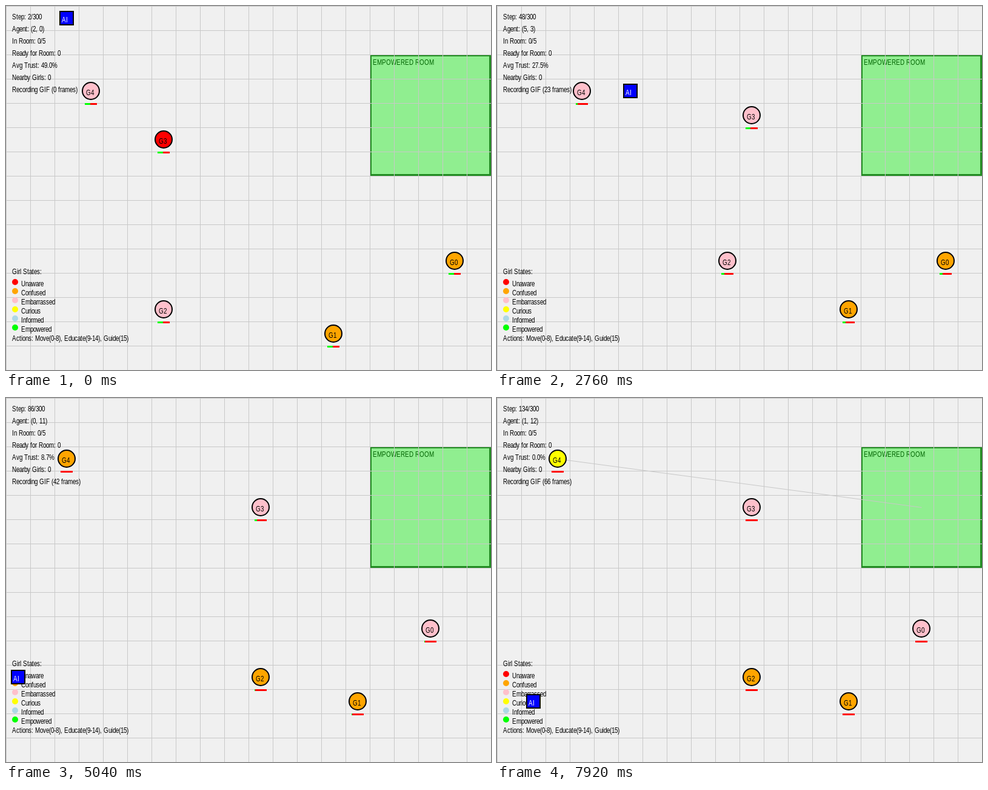
These frames come from a looping animation (800x600 px, 8000 ms). An HTML page with a canvas:

```html
<!DOCTYPE html>
<html lang="en">
<head>
<meta charset="utf-8">
<title>Grid simulation</title>
<style>
  html, body { margin: 0; width: 100%; height: 100%; overflow: hidden; background: #f0f0f0; }
  canvas { display: block; }
</style>
</head>
<body>
<canvas id="stage" width="800" height="600"></canvas>
<script>
const ctx = document.getElementById('stage').getContext('2d');
const CELL = 40, LOOP = 8000, TICK = 120;
const FACE = '"Liberation Sans", Arial, sans-serif';
const SIZE = 12, NARROW = 0.82;

const STATES = {
  Unaware: '#ff0000', Confused: '#ffa500', Embarrassed: '#ffc0cb',
  Curious: '#ffff00', Informed: '#add8e6', Empowered: '#00ff00'
};

// Paths hold [tick, column, row]; moods and bonus hold [tick, value].
const agentPath = [[0, 2, 0], [6, 4, 1], [16, 5, 3], [24, 5, 3], [32, 0, 6], [34, 0, 6],
  [47, 0, 14], [51, 0, 14], [55, 0, 12], [63, 0, 12], [64, 1, 12]];

const girls = [
  { path: [[25, 18, 10], [26, 17, 9]],
    moods: [[0, 'Confused'], [31, 'Embarrassed']], bonus: [[0, 0], [30, 0.5]] },
  { path: [[18, 13, 13], [19, 14, 12]],
    moods: [[0, 'Confused'], [4, 'Embarrassed'], [11, 'Confused']], bonus: [[0, 0]] },
  { path: [[0, 6, 12], [6, 8, 10], [20, 8, 10], [21, 9, 10], [27, 9, 10], [28, 10, 11]],
    moods: [[0, 'Embarrassed'], [31, 'Confused']], bonus: [[0, 0]] },
  { path: [[17, 6, 5], [22, 10, 4]],
    moods: [[0, 'Unaware'], [4, 'Confused'], [20, 'Embarrassed']], bonus: [[0, 0], [20, 15]] },
  { path: [[28, 3, 3], [29, 2, 2]],
    moods: [[0, 'Embarrassed'], [31, 'Confused'], [43, 'Embarrassed'], [58, 'Curious']],
    bonus: [[0, 0], [13, -11.5], [19, -7.5]] }
];

function cellAt(path, tick) {
  const next = path.findIndex(p => p[0] > tick);
  if (next === 0) return path[0].slice(1);
  if (next < 0) return path[path.length - 1].slice(1);
  const [t0, x0, y0] = path[next - 1], [t1, x1, y1] = path[next];
  const u = (tick - t0) / (t1 - t0);
  return [Math.round(x0 + (x1 - x0) * u), Math.round(y0 + (y1 - y0) * u)];
}

const latest = (events, tick) => events.filter(e => e[0] <= tick).pop()[1];
const center = cell => cell * CELL + CELL / 2;

function box(x, y, w, h, color) {
  ctx.fillStyle = color;
  ctx.fillRect(x, y, w, h);
}

function disc(x, y, r, color) {
  ctx.fillStyle = color;
  ctx.beginPath();
  ctx.arc(x, y, r, 0, Math.PI * 2);
  ctx.fill();
}

// Condensed lettering on whole-pixel advances, as a bitmap renderer sets it.
const advances = {};
function advance(ch) {
  if (!(ch in advances)) {
    ctx.font = `1000px ${FACE}`;
    advances[ch] = Math.round(ctx.measureText(ch).width / 1000 * SIZE * NARROW);
  }
  return advances[ch];
}

function label(text, x, top, color = '#000') {
  for (const ch of text) {
    const step = advance(ch);
    ctx.font = `${SIZE}px ${FACE}`;
    ctx.fillStyle = color;
    ctx.save();
    ctx.translate(x, top + 12);
    ctx.scale(NARROW, 1);
    ctx.fillText(ch, 0, 0);
    ctx.restore();
    x += step;
  }
}

function drawBoard() {
  box(0, 0, 800, 600, '#f0f0f0');
  box(600, 80, 200, 200, '#228b22');
  box(603, 83, 194, 194, '#90ee90');
  label('EMPOWERED ROOM', 605, 85, '#006400');
  for (let x = 0; x < 800; x += CELL) box(x, 0, 1, 600, '#c8c8c8');
  for (let y = 0; y < 600; y += CELL) box(0, y, 800, 1, '#c8c8c8');
}

function drawPanel(tick, agent, trusts) {
  const average = trusts.reduce((a, b) => a + b) / trusts.length;
  [
    `Step: ${2 + 2 * tick}/300`,
    `Agent: (${agent.join(', ')})`,
    'In Room: 0/5',
    'Ready for Room: 0',
    `Avg Trust: ${average.toFixed(1)}%`,
    'Nearby Girls: 0',
    `Recording GIF (${tick} frames)`
  ].forEach((line, i) => label(line, 10, 10 + 20 * i));

  label('Girl States:', 10, 430);
  Object.entries(STATES).forEach(([name, color], i) => {
    disc(15, 455 + 15 * i, 5, color);
    label(name, 25, 450 + 15 * i);
  });
  label('Actions: Move(0-8), Educate(9-14), Guide(15)', 10, 540);
}

function drawGirl(girl, index, tick, trust) {
  const [x, y] = cellAt(girl.path, tick).map(center);
  const mood = latest(girl.moods, tick);
  if (mood === 'Curious') {
    ctx.strokeStyle = '#c8c8c8';
    ctx.lineWidth = 1;
    ctx.beginPath();
    ctx.moveTo(x + 0.5, y + 0.5);
    ctx.lineTo(700.5, 180.5);
    ctx.stroke();
  }
  disc(x, y, 15, '#000');
  disc(x, y, 13, STATES[mood]);
  label('G' + index, x - 8, y - 5);
  box(x - 10, y + 20, 20, 3, '#ff0000');
  box(x - 10, y + 20, Math.floor(trust / 5), 3, '#00ff00');
}

function drawAgent(cell) {
  const [x, y] = cell.map(center);
  box(x - 12, y - 12, 24, 24, '#000');
  box(x - 10, y - 10, 20, 20, '#0000ff');
  label('AI', x - 8, y - 5, '#fff');
}

function render(now) {
  const tick = Math.floor((now % LOOP) / TICK);
  const agent = cellAt(agentPath, tick);
  const trusts = girls.map(g => Math.max(0, 49 - tick + latest(g.bonus, tick)));
  drawBoard();
  drawPanel(tick, agent, trusts);
  girls.forEach((g, i) => drawGirl(g, i, tick, trusts[i]));
  drawAgent(agent);
}

const start = performance.now();
function loop() {
  render(performance.now() - start);
  requestAnimationFrame(loop);
}
loop();
</script>
</body>
</html>
```
